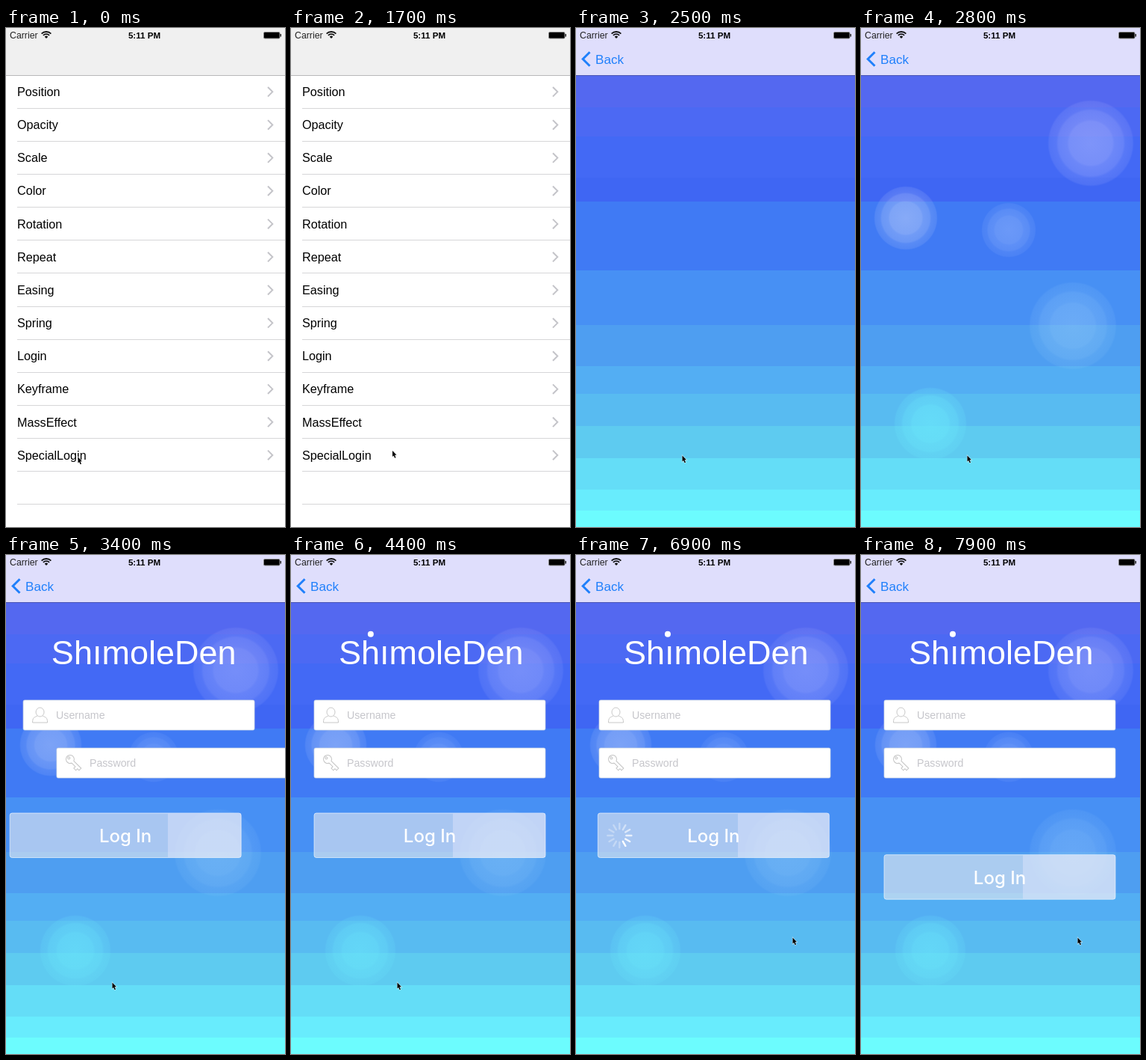
Animation, 374 px wide and 667 px high, one loop 8000 ms. Source, as an HTML page with a canvas:

```html
<!DOCTYPE html>
<html lang="en">
<head>
<meta charset="utf-8">
<title>Login animation</title>
<style>
  html, body { margin: 0; width: 100%; height: 100%; overflow: hidden; background: #fff; }
  canvas { display: block; }
</style>
</head>
<body>
<canvas id="stage" width="374" height="667"></canvas>
<script>
const W = 374, H = 667, LOOP = 8000;
const c = document.getElementById('stage').getContext('2d');
const rows = ['Position', 'Opacity', 'Scale', 'Color', 'Rotation', 'Repeat', 'Easing',
  'Spring', 'Login', 'Keyframe', 'MassEffect', 'SpecialLogin'];
const rowHeight = 44.15;
// top edge and colour of each background band
const bands = [[0, '#5468f0'], [106, '#4c69f3'], [145, '#4369f5'], [200, '#3f66f3'],
  [232, '#407af4'], [324, '#4790f4'], [397, '#4e9ef1'], [452, '#53aef3'], [489, '#58bbf1'],
  [532, '#5ecbf0'], [575, '#64ddf7'], [617, '#68ecfd'], [645, '#6cfcfe']];
// x, y, radius, start time, colour, strength
const bubbles = [
  [308, 154, 58, 2520, '190,195,255', .48],
  [60, 254, 42, 2560, '205,218,250', .5],
  [198, 270, 34, 2620, '190,212,255', .34],
  [284, 398, 59, 2520, '165,215,250', .38],
  [93, 529, 48, 2560, '105,230,250', .75]];
// time, x, y of the pointer tip
const pointerPath = [[600, 96, 573], [900, 152, 572], [1100, 152, 571], [1500, 129, 558],
  [1900, 142, 571], [5200, 142, 571], [5800, 154, 360], [6400, 154, 360], [6850, 290, 511]];
const PUSH = 2067, DOT = 4110, SHAKE = 6270, DROP = 7726;

const clamp = v => Math.max(0, Math.min(1, v));
const ease = v => v * v * (3 - 2 * v);

// Remaining share of the distance: 1 before the start, ringing down to 0
function spring(t, start, damping, speed) {
  const s = Math.max(0, t - start) / 1000;
  return Math.exp(-damping * s) * Math.cos(speed * s);
}

function text(str, x, y, size, color, weight = 400, align = 'left', family = 'Liberation Sans') {
  c.font = `${weight} ${size}px "${family}", Arial, sans-serif`;
  c.fillStyle = color;
  c.textAlign = align;
  c.fillText(str, x, y);
}

function rect(x, y, w, h, color) {
  c.fillStyle = color;
  c.fillRect(x, y, w, h);
}

function roundRect(x, y, w, h, r, fill, stroke) {
  c.beginPath();
  c.roundRect(x, y, w, h, r);
  c.fillStyle = fill;
  c.fill();
  if (stroke) line(stroke, 1);
}

function line(color, width) {
  c.strokeStyle = color;
  c.lineWidth = width;
  c.stroke();
}

function chevron(x, y, dx, dy, color, width) {
  c.beginPath();
  c.moveTo(x, y - dy);
  c.lineTo(x + dx, y);
  c.lineTo(x, y + dy);
  line(color, width);
}

function disc(x, y, r, fill) {
  c.beginPath();
  c.arc(x, y, r, 0, 7);
  c.fillStyle = fill;
  c.fill();
}

function drawList(shift, pressed) {
  rect(0, 0, W, H, '#fff');
  c.save();
  c.translate(shift, 0);
  if (pressed) rect(0, 549, W, 44, '#cbcbcd');
  for (let i = 0; i < 13; i++) {
    rect(15, Math.round(106.6 + i * rowHeight), W, 1, '#d6d6d8');
    if (!rows[i]) continue;
    const y = 85.3 + i * rowHeight;
    text(rows[i], 15, y + 5.7, 16.2, '#000');
    chevron(351, y, 6.3, 6.3, '#c4c4c9', 2);
  }
  c.restore();
}

function drawBackdrop(t) {
  bands.forEach(([y, color], i) => {
    const end = i < bands.length - 1 ? bands[i + 1][0] : H;
    rect(0, y, W, end - y, color);
  });
  for (const [x, y, radius, start, color, strength] of bubbles) {
    const r = radius * (1 - spring(t, start, 14, 17));
    if (r <= 0) continue;
    const k = strength * (1 - 0.15 * clamp((t - 2850) / 300));
    const g = c.createRadialGradient(x, y, 0, x, y, r);
    [[0, 1], [.5, .88], [.55, .7], [.75, .6], [.8, .36], [.96, .26], [1, 0]]
      .forEach(([p, a]) => g.addColorStop(p, `rgba(${color},${a * k})`));
    disc(x, y, r, g);
  }
}

function drawUserIcon() {
  c.beginPath();
  c.ellipse(53.5, 210, 5.5, 6, 0, 0, 7);
  c.moveTo(50, 215);
  c.bezierCurveTo(46, 217, 43.5, 217, 43.5, 224);
  c.lineTo(63.5, 224);
  c.bezierCurveTo(63.5, 217, 61, 217, 57, 215);
  line('#c8c8c8', 1);
}

function drawKeyIcon() {
  c.save();
  c.translate(49, 273);
  c.rotate(Math.PI / 4);
  c.beginPath();
  c.arc(0, 0, 5.5, .35, 5.93);
  c.lineTo(19, -2);
  c.lineTo(19, 2);
  c.lineTo(16, 2);
  c.lineTo(16, 5);
  c.lineTo(12, 5);
  c.lineTo(12, 2);
  c.lineTo(5.2, 2);
  c.moveTo(-.8, 0);
  c.arc(-2.3, 0, 1.5, 0, 7);
  line('#c4c4c4', 1);
  c.restore();
}

function drawField(x, y, label, icon) {
  c.save();
  c.translate(x, 0);
  roundRect(31, y, 310, 40, 2, '#fff', 'rgba(205,215,225,.7)');
  text(label, 75, y + 25, 14.2, '#c6c6cb');
  icon();
  c.restore();
}

function drawSpinner(t) {
  const head = Math.floor(t * 12 / 1000) + 4;
  c.lineCap = 'round';
  for (let i = 0; i < 12; i++) {
    const a = i * Math.PI / 6, age = ((head - i) % 12 + 12) % 12;
    c.beginPath();
    c.moveTo(60 + 9 * Math.cos(a), 375 + 9 * Math.sin(a));
    c.lineTo(60 + 16 * Math.cos(a), 375 + 16 * Math.sin(a));
    line(`rgba(255,255,255,${Math.max(.32, 1 - age * .13)})`, 2.4);
  }
  c.lineCap = 'butt';
}

function drawForm(t) {
  const slide = start => -W * spring(t, start, 9, 14);
  const logo = slide(2900);
  text('Sh\u0131moleDen', 64 + logo, 146, 45, '#fff', 300);
  if (t >= DOT) disc(123 - W / 2 * spring(t, DOT, 2.3, 26.5), 105.7, 4, '#fff');
  drawField(slide(3000), 194, 'Username', drawUserIcon);
  drawField(slide(3150), 258, 'Password', drawKeyIcon);

  const shake = t >= SHAKE ? -30 * spring(t, SHAKE, 4.6, 20) : 0;
  const x = slide(3300) + shake;
  const y = 90 * ease(clamp((t - DROP) / 300));
  c.save();
  c.translate(x, y);
  roundRect(31, 345, 310, 59.5, 3, 'rgba(238,238,240,.58)', 'rgba(255,255,255,.6)');
  rect(217 - x, 345.5, Math.max(0, 124 + x), 58.5, 'rgba(236,236,255,.36)');
  text('Log In', 186, 384, 24, '#fff', 500, 'center', 'Inter');
  if (t >= SHAKE && t < DROP) drawSpinner(t);
  c.restore();
}

function drawNav(p) {
  const x = W * (1 - p);
  let fill = p === 0 ? '#f0f0f0' : '#dfdefc';
  if (p > 0 && p < 1) {
    fill = c.createLinearGradient(x - 18, 0, x + 5, 0);
    fill.addColorStop(0, '#efefef');
    fill.addColorStop(1, '#dfdefc');
  }
  rect(0, 0, W, 63, fill);
  rect(0, 63, W, 1, '#b8b8ba');
  if (p > 0) rect(x, 63, W, 1, '#4a55b4');

  if (p > 0) {
    c.globalAlpha = p < 1 ? .1 * p + .9 * p ** 12 : 1;
    chevron(18.5, 41.5, -9.3, 9.3, '#2080fb', 3);
    text('Back', 26 + 142 * (1 - p), 47.5, 17.1, '#2080fb');
    c.globalAlpha = 1;
  }
  drawStatus();
}

function drawStatus() {
  text('Carrier', 5, 14, 12.3, '#222');
  text('5:11 PM', 185.5, 14, 11.6, '#000', 700, 'center');
  for (const r of [9, 5.8]) {
    c.beginPath();
    c.arc(54, 14, r, -Math.PI * .75, -Math.PI * .25);
    line('#111', 1.8);
  }
  c.beginPath();
  c.moveTo(54, 14);
  c.arc(54, 14, 3.2, -Math.PI * .75, -Math.PI * .25);
  c.fillStyle = '#111';
  c.fill();
  roundRect(345.5, 5.5, 21.5, 8.5, 1.5, '#000', '#8a8a8a');
  rect(367.5, 8, 1.5, 3.5, '#222');
}

function drawPointer(t) {
  let [, x, y] = pointerPath[0];
  for (let i = 1; i < pointerPath.length; i++) {
    const [t0, x0, y0] = pointerPath[i - 1], [t1, x1, y1] = pointerPath[i];
    if (t < t0) break;
    const k = ease(clamp((t - t0) / (t1 - t0)));
    x = x0 + (x1 - x0) * k;
    y = y0 + (y1 - y0) * k;
  }
  c.beginPath();
  [[0, 0], [0, 8], [1.7, 6.4], [3.1, 9.8], [4.5, 9.2], [3.1, 5.8], [5.5, 5.8]]
    .forEach(([dx, dy]) => c.lineTo(x + dx + .5, y + dy + .5));
  c.closePath();
  line('rgba(255,255,255,.65)', 1.2);
  c.fillStyle = '#000';
  c.fill();
}

function draw(t) {
  const k = Math.max(0, t - PUSH) * .01826;
  const p = k > 7.6 ? 1 : 1 - Math.exp(-k) * (1 + k);
  const x = W * (1 - p);
  if (p < 1) {
    drawList(-.3 * W * p, t >= 2000);
    if (p > 0) {
      rect(0, 0, W, H, `rgba(0,0,0,${.1 * p})`);
      rect(x - 8, 64, 8, H, 'rgba(0,0,0,.07)');
    }
  }
  if (p > 0) {
    c.save();
    c.translate(x, 0);
    drawBackdrop(t);
    drawForm(t);
    c.restore();
  }
  drawNav(p);
  drawPointer(t);
}

let began;
function tick(now) {
  began ??= now;
  draw((now - began) % LOOP);
  requestAnimationFrame(tick);
}
draw(0);
requestAnimationFrame(tick);
</script>
</body>
</html>
```
